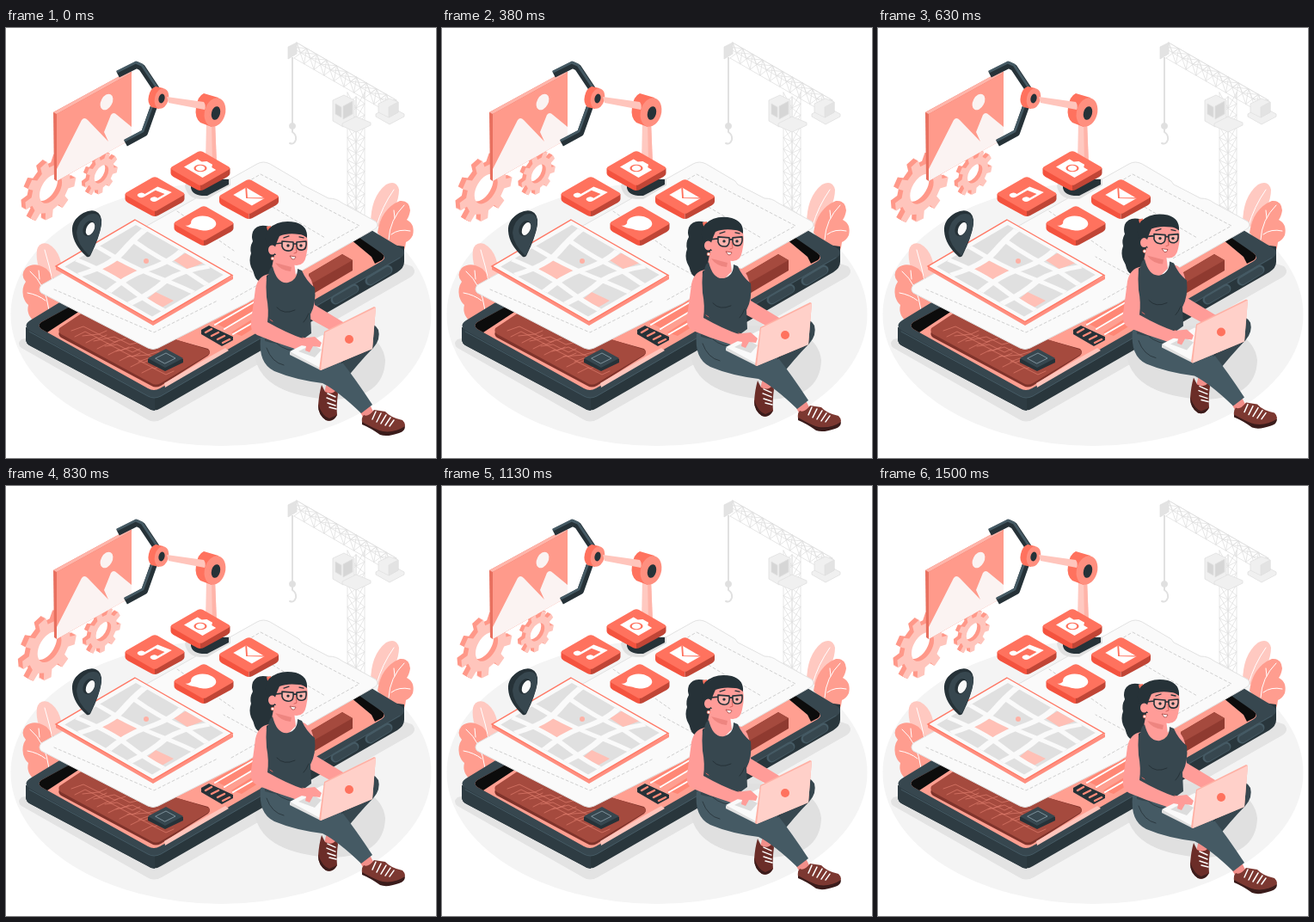
Write an HTML page that moves like this. It is 500x500 px and loops after 1540 ms.

```html
<!DOCTYPE html>
<html lang="en">
<meta charset="utf-8">
<title>Building an app</title>
<style>
  html, body { margin: 0; width: 100%; height: 100%; overflow: hidden; background: #fff }
  svg { display: block; width: 100vw; height: 100vh }
  .line { fill: none; stroke-linecap: round; stroke-linejoin: round }
  .skin { fill: #ff9c98 }
</style>
<svg viewBox="0 0 500 500">
  <ellipse cx="250" cy="333" rx="244.500" ry="153" fill="#f4f4f4"/>

  <g id="crane" stroke="#e0e0e0" fill="#f0f0f0" stroke-width=".8">
    <path id="truss" class="line"/>
    <path d="M328 22l10-5v13l-10 6z" fill="#e3e3e3"/>
    <path d="M333 34v78" stroke-width="1.600" stroke="#dadada"/>
    <circle cx="333" cy="114" r="3.600" fill="#e0e0e0"/>
    <path class="line" d="M333 117v4q5 3 4 9-2 6-7 4" stroke-width="2"/>
    <path d="M380 84l13-6 12 6v22l-13 9-12-7z"/>
    <path d="M392 91l11-6v15l-11 6zM383 88l7 4v12l-7-4z" fill="#d6d6d6"/>
    <path d="M391 111l16-8 17 7v3l-17 8-16-7z"/>
    <path d="M430 100l16-9 17 9v3l-17 9-16-9z"/>
    <path d="M433 88l13-6 10 4v12l-11 6-12-6z"/><path d="M445 92l11-6v12l-11 6z" fill="#e3e3e3"/>
  </g>

  <g id="leaves">
    <path d="M66 300Q68 261 49 251q-10-3-13 7-3 20 16 46z" fill="#ffc9c1"/>
    <path d="M62 322q-1-28-15-42-14-9-24-1-7 8 0 16-5 7-3 17 2 7 6 10-3 12 8 20z" fill="#ff9d8f"/>
    <path d="M424 228q0-32 18-46 12-6 15 6 0 20-20 44z" fill="#ffc9c1"/>
    <path d="M432 238q4-28 26-37 11-1 12 11-1 7-4 11 10 5 7 18-3 6-8 8-1 12-8 18z" fill="#ff9d8f"/>
    <path class="line" stroke="#fff" d="M45 258q6 20 10 40M28 283q18 15 22 45M25 308q12 2 21 9M39 292l-1-10M451 188q-14 20-20 42M463 206q-17 17-18 40M470 236q-13-3-22 4M452 221l-1-9"/>
  </g>

  <path d="M18 362q-6 5 0 10l146 83q8 5 17 0L470 290q9-6 2-13l-30-10z" fill="#e3e3e3"/>
  <path d="M290 385q4-36 70-39 76-1 81 40-1 45-63 46-78-5-88-47z" fill="#e0e0e0"/>

  <g id="gears"></g>

  <g id="picture">
    <path d="M55 98l88-48 3 1v77l-87 50-3-2z" fill="#e8705f"/>
    <path d="M55 98l88-48 3 2-87 48z" fill="#ffb5aa"/>
    <path d="M59 100l87-48v77l-87 49z" fill="#ff9a8b"/>
    <path d="M59 164l29-57q3-4 7 0l24 25-5-11 8-20q3-4 7 0l17 14v14l-87 49z" fill="#fbf3f2"/>
    <ellipse cx="117" cy="86" rx="6.500" ry="10" transform="rotate(28 117 86)" fill="#fbf3f2"/>
  </g>

  <g id="arm">
    <path fill="none" stroke="#263238" stroke-width="8" stroke-linejoin="round" d="M130 54l22-11 6 3 18 27M172 91l-11 31-22 12"/>
    <path fill="none" stroke="#455a64" stroke-width="3" stroke-linejoin="round" d="M129 51l22-11 7 3 18 27M170 90l-11 30-21 11"/>
    <path d="M233 108h10l2 50h-13z" fill="#ffc9c1"/>
    <path d="M239 108h4l2 50h-5z" fill="#ffb4a9"/>
    <path d="M174 68l9 2-5 24-9-2q-5-5-3-13 2-9 8-11z" fill="#ff725e"/>
    <ellipse cx="181" cy="82" rx="8" ry="12" transform="rotate(15 181 82)" fill="#ff8f7f"/>
    <ellipse cx="181" cy="82" rx="3.500" ry="5.500" transform="rotate(15 181 82)" fill="#263238"/>
    <path d="M230 76l17 5-8 34-13-5q-7-6-5-18 2-13 9-16z" fill="#ff725e"/>
    <ellipse cx="243" cy="98" rx="12" ry="17" transform="rotate(15 243 98)" fill="#ff8f7f"/>
    <ellipse cx="244" cy="99" rx="5" ry="8" transform="rotate(15 244 99)" fill="#263238"/>
    <path d="M187 80l43 6q3 4 1 9l-42-8z" fill="#ffc5bc"/>
  </g>

  <g id="phone">
    <path d="M23 348v14q0 5 6 8l136 72q7 5 15 0l275-158q8-5 8-12v-18l-30-4-260 130z" fill="#29363c"/>
    <path d="M23 348v14q0 5 6 8l136 72q4 3 8 3v-20z" fill="#2e3c43"/>
    <path d="M28 340q-9 6 0 12l137 76q7 4 15 0l278-160q10-7 0-13L320 172q-10-4-20 2z" fill="#37474f"/>
    <path class="line" d="M27 353l138 75q7 4 15 0l278-161" stroke="#455a64"/>
    <path d="M41 342q-5 4 0 8l124 69q7 4 14 0l258-148q6-4 0-9l-117-68z" fill="#ff9f91"/>
    <path d="M41 342l35-19 10 6-38 25-7-4q-5-4 0-8zM401 246l10-2 26 18q5 4 0 8l-8 4-4-8z" fill="#0c0c0c"/>
    <path d="M62 353l30-20 143 40q4 4 0 8l-55 35q-6 3-11 0L64 360q-4-3-2-7z" fill="#7f332b"/>
    <path d="M62 349l30-20 143 45q4 3 0 6l-55 33q-6 3-11 0L64 356q-4-3-2-7z" fill="#a54a3e"/>
    <path id="wires" class="line" stroke="#d97768" stroke-width=".8"/>
    <path d="M184 413l53-31 18-10 4 3-74 43z" fill="#ffc5bc"/>
    <path d="M241 342l45-26 9 10-38 24zM262 354l35-22 4 9-27 17z" fill="#ff8775"/>
    <path class="line" stroke="#fff" stroke-width="2" d="M243 345l50-29M254 350l42-25M264 356l33-19"/>
    <path d="M227 351l9-5 28 13v4l-13 7-24-14z" fill="#263238"/>
    <path class="line" stroke="#ff8a79" stroke-width="2.500" d="M232 354l7-4M239 358l8-4M246 362l8-4M252 366l8-4"/>
    <path d="M165 385l21-11 20 11v4l-21 10-20-10z" fill="#263238"/>
    <path d="M165 384l21-11 20 11-21 11z" fill="#37474f"/>
    <path class="line" d="M174 384l12-6 11 6-12 6z" stroke="#90a4ae" stroke-width=".8"/>
    <path d="M352 286l39-23 12 7v12l-49 29z" fill="#8f3a30"/><path d="M352 286l39-23 12 7-49 28z" fill="#a54a3e"/>
    <g class="line">
      <path d="M383 316l22-13M423 294l21-13" stroke="#455a64" stroke-width="11"/>
      <path d="M384 316l21-12M424 294l20-12" stroke="#37474f" stroke-width="8"/>
    </g>
  </g>

  <g id="sheets">
    <path d="M41 299l251-141q7-4 15 0l34 20q2 5 7 6l27 14q9 0 15 5l40 22q4 4 0 8l-126 72-24 15-103 52q-6 3-12 0L41 308q-4-4 0-9z" fill="#fafafa" stroke="#e2e2e2"/>
    <path class="line" d="M56 304l116 50 74-37M262 316l41-23-50-27M265 188l31-18 115 60-70 39M279 190l92 54M199 213l66 46" stroke="#cfcfcf" stroke-dasharray="3 3"/>
  </g>

  <g id="map">
    <path d="M58 277v4l113 65 93-54v-4l-93 51z" fill="#ff8f80"/>
    <g transform="matrix(.92 -.54 1.13 .645 58 277)">
      <path d="M0 0h100v100H0z" fill="#fafafa" stroke="#ff7966" stroke-width="1.400"/>
      <path d="M5 5h90v90H5z" fill="#e0e0e0"/>
      <path d="M22 24l22 2 3 20-21 1zM80 56h15v18l-16-3zM20 77l14-2 2 17H22z" fill="#ffc0b6"/>
      <g class="line" stroke="#fafafa" stroke-width="5.500" style="stroke-linecap:butt">
        <path d="M5 20q30 8 52 2t38-8M5 50q28-4 46 0 24 6 44 2M5 72q26 2 48-2 22 0 42 10M20 5q6 30 2 52t-3 38M47 5q-1 34 4 56t6 34M76 18q-4 30 0 54l-2 23"/>
      </g>
    </g>
    <circle cx="163" cy="271" r="3" fill="#ffb0a4"/>
  </g>

  <g id="pin">
    <path d="M77 236q-1-13 13-21 8-4 14-2 8 3 7 15-2 15-13 37-2 2-4 1-16-14-17-30z" fill="#263238"/>
    <path d="M82 238q1-14 14-21 14-4 15 9-1 14-14 39-14-13-15-27z" fill="#37474f"/>
    <ellipse cx="96.500" cy="233" rx="6.500" ry="9.500" transform="rotate(25 96.500 233)" fill="#263238"/>
    <ellipse cx="98" cy="233.500" rx="4.500" ry="8" transform="rotate(25 98 233.500)" fill="#fafafa"/>
  </g>

  <path d="M208 184q3 14 18 15h8l27-16v-8h-50z" fill="#e0e0e0"/>
  <path d="M215 186q2 10 19 9l25-13v-6h-44z" fill="#263238"/>
  <g id="tiles"></g>

  <g id="woman">
    <path d="M306 231q-14-4-19 6-2 6 0 11-4 7-2 14-3 8 0 16 3 5 4 10 3 8 10 7 8-2 10-13 6-9 5-18-2-14-8-33z" fill="#263238"/>
    <path d="M303 231l5-1 2 12-4 2z" fill="#ff725e"/>

    <path d="M373 412l13 3-2 16-15-2z" fill="#f28f8a"/>
    <path d="M367 415l4 8q8 4 13-2l2 4q-2 15-1 25-5 9-13 6-9-6-9-17 1-14 4-24z" fill="#6b2d28"/>
    <path d="M363 438q5 14 13 16l9-4q-5 9-13 6-9-6-9-18z" fill="#3b1c1b"/>
    <path class="line" stroke="#fff" stroke-width="1.500" d="M374 425l9 4M373 430l10 4M374 436l9 3M376 441l8 2"/>
    <path d="M391 347q33-12 42 4 3 11-6 21-16 16-38 44l-25-8 13-30z" fill="#37474f"/>
    <path d="M412 447l11-9 7 14-13 4z" fill="#f28f8a"/>
    <path d="M416 450q5 3 12-6l13 2q6 7 20 10 6 6 0 11-15 8-25 5-11-8-22-13-1-6 2-9z" fill="#7c3831"/>
    <path d="M414 458q18 10 24 11 14 2 26-6 0 6-7 8-14 5-22 2-11-8-21-12z" fill="#3b1c1b"/>
    <path class="line" stroke="#fff" stroke-width="1.500" d="M426 455l4-9M431 458l5-10M436 460l6-10M441 462l6-9M446 463l5-7"/>
    <path d="M296 360q-3 30 16 39 24 10 56 14 18 9 45 35l13-10q-19-29-37-52-30-13-47-9l-30-22z" fill="#455a64"/>
    <path class="line" stroke="#263238" stroke-width=".8" d="M303 372q6 17 20 20M390 390l16-14M315 367q10 9 28 9"/>

    <path class="skin" d="M343 283q11 3 14 16l2 23 38 23-13 10-33-18z"/>
    <path class="skin" d="M312 264h22l3 24-14 14-16-13z"/>
    <path d="M313 273q6 9 18 10l1-5z" fill="#ee8580"/>
    <path d="M307 280l3-3q5 21 18 19 11-3 11-16l5 2q5 12 15 20 2 18-5 31l1 22q-22 19-54 9-2-16 2-30l-3-34z" fill="#37474f"/>
    <path class="line" d="M315 325q8 9 21 3M352 332q-3 7-6 10" stroke="#263238"/>
    <path class="skin" d="M306 286q-13 2-16 17-2 16-5 37-2 13 7 17 21 9 41 15l22 8q9-1 8-8l-5-8-13-3q-18-6-41-19 2-14-1-29-1-12 0-25z"/>
    <path class="line" d="M307 339l3 2M345 360l18 7" stroke="#d8655f"/>

    <path class="skin" d="M310 244q11-11 38-8 5 13 1 29-2 11-11 11-18-1-28-18z"/>
    <path d="M305 256q-7-14 1-23 12-11 31-7 14 4 13 18-5-4-9-4-14-2-23 2-3 6-6 16z" fill="#263238"/>
    <ellipse class="skin" cx="309.500" cy="258" rx="4.500" ry="5.500"/>
    <circle cx="310" cy="268" r="1.800" fill="#fff" stroke="#ff725e" stroke-width=".7"/>
    <g class="line" stroke="#263238" stroke-width="1.600">
      <path d="M312 251l9-1M321 248l13 1q1 9-4 10-7 1-9-5zM338 249l11-1q1 9-4 10-6 1-7-4zM334 251h4" fill="#ffb3ad"/>
      <path d="M323 244l6-2M341 243l5 1" stroke-width="1.300"/>
    </g>
    <circle cx="328" cy="253" r="1.700" fill="#263238"/><circle cx="343" cy="253" r="1.700" fill="#263238"/>
    <path class="line" d="M337 254l1 7-3 1" stroke="#d8655f"/>
    <path d="M330 265l7 1q-1 4-4 3z" fill="#fff" stroke="#a53c38" stroke-width=".8"/>

    <path d="M330 377l38-19 12 6-14 34-36-18z" fill="#e0e0e0"/>
    <path d="M330 376l38-19 10 5-13 33z" fill="#fafafa"/>
    <path d="M340 376l16-8 11 6-8 9z" fill="#dcdcdc"/>
    <path class="skin" d="M341 361l18-2 8 7-2 5-8-1-4 7-5-2 1-5-12-2z"/>
    <path d="M370 353l58-29 2 1-4 48-60 25-2-1z" fill="#ffb0a4"/>
    <path d="M371 354l59-29-4 48-60 25z" fill="#ffd0c9"/>
    <circle cx="399" cy="362" r="5" fill="#ff725e"/>
  </g>
</svg>
<script>
  const byId = id => document.getElementById(id);
  const LOOP = 1540, FLOAT = 1500, PULSE = 530, PEAK = 190;

  // Two chords joined by a zigzag
  function truss(x1, y1, x2, y2, dx, dy, n) {
    const at = (i, side) => `${x1 + (x2 - x1) * i / n + dx * side} ${y1 + (y2 - y1) * i / n + dy * side}`;
    let d = `M${at(0, 0)}L${at(n, 0)}M${at(0, 1)}L${at(n, 1)}`;
    for (let i = 0; i < n; i++) d += `M${at(i, 0)}L${at(i + 1, 1)}L${at(i + 1, 0)}L${at(i, 1)}`;
    return d;
  }
  byId('truss').setAttribute('d',
    truss(338, 17, 454, 84, -3, 18, 10) + truss(338, 17, 454, 84, -7, 5, 10) +
    truss(397, 75, 397, 219, 10, 5, 11) + truss(407, 80, 407, 224, 10, -5, 11));

  let wires = '';
  for (let i = 0; i < 7; i++) {
    wires += `M${76 + i * 13} ${352 + i * 6}l${14 + i % 3 * 5} ${-5 + i % 2 * 3}l18 9l${9 + i % 3 * 4} -4`;
    wires += `M${80 + i * 13} ${359 + i * 7}l12 -6l16 8l9 -4`;
  }
  byId('wires').setAttribute('d', wires);

  function gearPath(r, hole, teeth) {
    const points = [];
    for (let i = 0; i < teeth; i++)
      for (const [shift, k] of [[-.28, .76], [-.2, 1], [.2, 1], [.28, .76]]) {
        const a = (i + shift) / teeth * 2 * Math.PI + .25;
        points.push(`${(r * k * Math.cos(a)).toFixed(2)} ${(r * k * Math.sin(a)).toFixed(2)}`);
      }
    return `M${points.join('L')}ZM${hole} 0A${hole} ${hole} 0 1 0 ${-hole} 0A${hole} ${hole} 0 1 0 ${hole} 0Z`;
  }
  function gear(x, y, r, hole, depth) {
    const d = gearPath(r, hole, 9);
    let out = '';
    for (let k = depth; k >= 0; k--)
      out += `<path d="${d}" fill-rule="evenodd" fill="${k ? '#ff9889' : '#ffc5bc'}"
        transform="matrix(.87 -.5 0 1 ${x - k} ${y - k * .55})"/>`;
    return out;
  }
  byId('gears').innerHTML = gear(52, 187, 34, 15, 5) + gear(111, 170, 22, 9.5, 4);

  const glyphs = {
    camera: '<path d="M-13-9h6l3-4h8l3 4h6V10h-26z"/><circle r="6.500" fill="#ff725e"/><circle r="4.500"/>',
    music: '<path d="M-7-11l17-3V7a4 4 0 1 1-3-4V-7L-4-5V11a4 4 0 1 1-3-4z"/>',
    mail: '<path d="M-13-9h26V9h-26z"/><path d="M-13-9L0 3 13-9" fill="none" stroke="#ff725e" stroke-width="1.600"/>',
    chat: '<path d="M-9 9A13 12 0 1 1 2 12Q-4 16-10 16-7 13-9 9z"/>'
  };
  const tile = (x, y, name) => `<g transform="translate(${x} ${y})">
    <path d="M-34.500 0v6q0 2 3 4L-4 25q2 1 4 1V10z" fill="#f4533f"/>
    <path d="M34.500 0v6q0 2-3 4L4 25q-2 1-4 1V10z" fill="#c04536"/>
    <g transform="matrix(.87 .5 -.87 .5 0 0)" fill="#fff">
      <rect x="-20.700" y="-20.700" width="41.400" height="41.400" rx="3.500" fill="#ff725e"/>
      <g transform="scale(.95)">${glyphs[name]}</g></g></g>`;
  byId('tiles').innerHTML = tile(226, 163, 'camera') + tile(173, 193, 'music') +
    tile(282.5, 196, 'mail') + tile(230, 227, 'chat');

  const ease = x => (1 - Math.cos(Math.PI * x)) / 2;
  function beat(t) {
    if (t >= 2 * PULSE) return 0;
    const p = t % PULSE;
    return p < PEAK ? ease(p / PEAK) : 1 - ease((p - PEAK) / (PULSE - PEAK));
  }

  function draw() {
    const t = performance.now() % LOOP;
    const lift = Math.max(0, 1 - Math.abs(t / (FLOAT / 2) - 1)) * 10;
    byId('woman').setAttribute('transform', `translate(0 ${-lift})`);
    byId('gears').setAttribute('transform', `translate(74 184) scale(${1 + .085 * beat(t)}) translate(-74 -184)`);
    requestAnimationFrame(draw);
  }
  draw();
</script>
</html>
```
